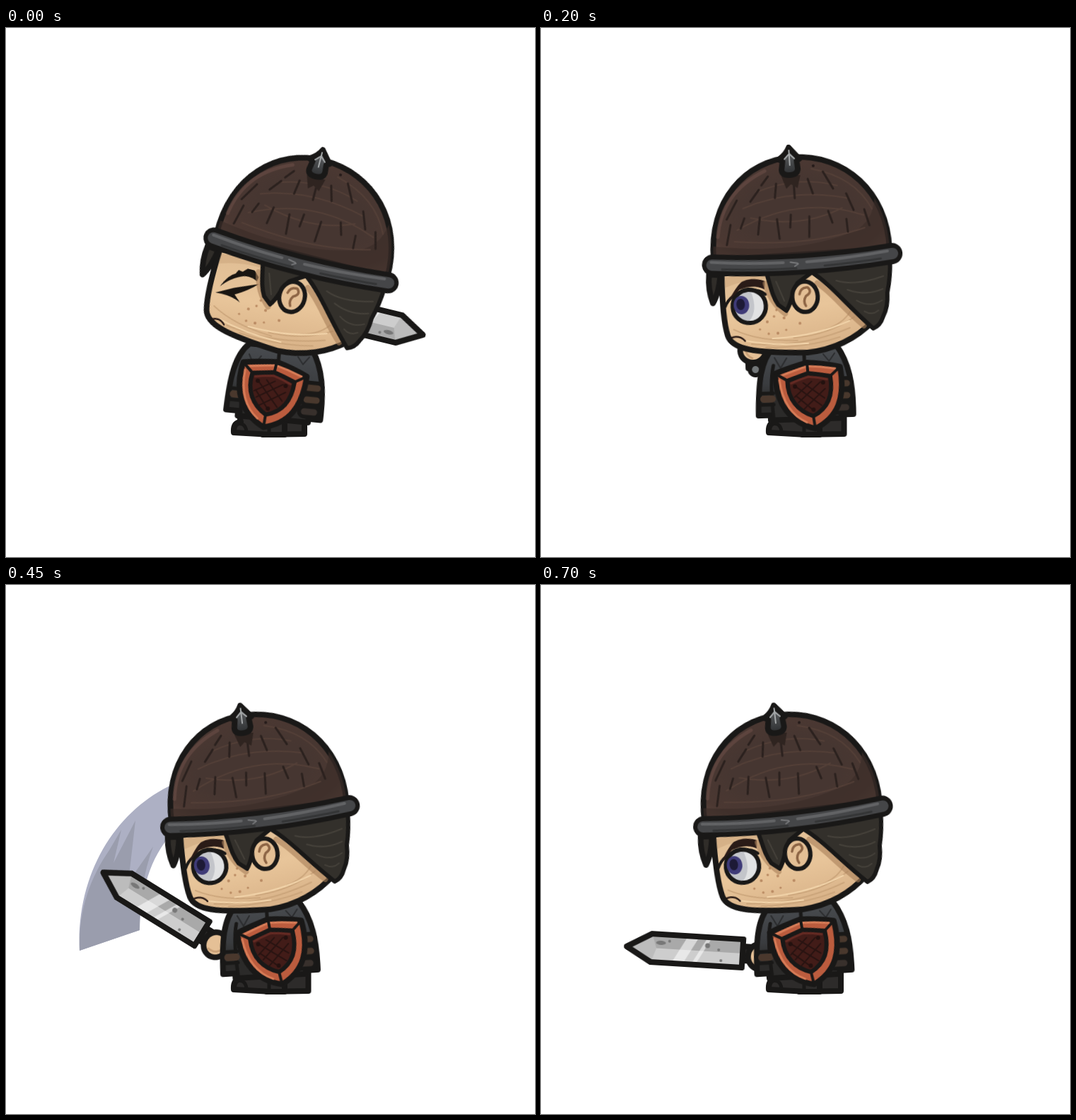
Recreate the animation shown at these times as an HTML page without scripts. Size 748 by 748 pixels, loop 0.75 s.

```html
<!DOCTYPE html>
<html lang="en">
<head>
<meta charset="utf-8">
<title>Sword swing</title>
<style>
  html, body { margin: 0; width: 100%; height: 100%; overflow: hidden; background: #fff; }
  svg { display: block; width: 100vw; height: 100vh; }
  .line { stroke: #191817; stroke-width: 8; stroke-linejoin: round; stroke-linecap: round; }
  .thin { stroke-width: 6; }
  .mark { fill: none; stroke-linecap: round; stroke-linejoin: round; }

  /* 15 poses of 50 ms; the steps sample the motion between the keys */
  .anim { animation: .75s steps(2) -.002s infinite; }
  .head { animation-name: head; transform-origin: 379px 380px; }
  .torso { animation-name: torso; transform-origin: 376px 555px; }
  .shield { animation-name: shield; }
  .sword { animation-name: sword; }
  .foot { animation-name: foot; }
  .trail { animation-name: trail; animation-timing-function: step-end; }
  .open { animation-name: open; animation-timing-function: step-end; }
  .closed { animation-name: closed; animation-timing-function: step-end; }

  @keyframes head {
    0% { transform: translate(25px, 0) rotate(14.4deg); animation-timing-function: steps(3); }
    20% { transform: none; }
    33.33% { transform: translate(-12.4px, 0) rotate(-7.4deg); }
    46.66% { transform: translate(-13px, 0) rotate(-7.2deg); }
    60% { transform: translate(-13.5px, 0) rotate(-6.9deg); }
    73.33% { transform: translate(-14px, 0) rotate(-6.6deg); animation-timing-function: steps(3); }
    93.33%, 100% { transform: translate(-16.6px, 0) rotate(-6.6deg); }
  }
  @keyframes torso {
    0% { transform: translate(2px, 0) rotate(5.6deg); animation-timing-function: steps(3); }
    20% { transform: none; }
    33.33% { transform: rotate(-3.6deg); }
    73.33% { transform: translate(-1px, 0) rotate(-3.6deg); animation-timing-function: steps(3); }
    93.33%, 100% { transform: translate(-2px, 0) rotate(-3.6deg); }
  }
  @keyframes shield {
    0% { transform: translate(372px, 518px) rotate(13.5deg); animation-timing-function: steps(3); }
    20% { transform: translate(377px, 521px) rotate(0deg); }
    33.33% { transform: translate(384px, 519px) rotate(-11deg); }
    46.66% { transform: translate(381px, 519px) rotate(-10.8deg); }
    60% { transform: translate(379px, 519px) rotate(-10.5deg); }
    73.33% { transform: translate(377px, 519px) rotate(-10.3deg); animation-timing-function: steps(3); }
    93.33%, 100% { transform: translate(375px, 519px) rotate(-10deg); }
  }
  @keyframes sword {
    0% { transform: translate(430px, 395px) rotate(193.7deg); animation-timing-function: steps(3); }
    20% { transform: translate(320px, 410px) rotate(113deg); }
    33.33% { transform: translate(284px, 452px) rotate(64.2deg); }
    46.66% { transform: translate(277.7px, 472.5px) rotate(47.5deg); }
    60% { transform: translate(277px, 493px) rotate(31.8deg); }
    73.33% { transform: translate(282px, 511px) rotate(13.5deg); animation-timing-function: steps(3); }
    93.33%, 100% { transform: translate(285px, 521px) rotate(3.5deg); }
  }
  @keyframes foot {
    0% { transform: translateX(-5px); animation-timing-function: steps(3); }
    20% { transform: none; }
    33.33% { transform: translateX(3px); }
    73.33% { transform: translateX(-2px); animation-timing-function: steps(3); }
    93.33%, 100% { transform: translateX(-3px); }
  }
  @keyframes trail {
    0%, 80% { visibility: hidden; }
    53.33% { visibility: visible; }
  }
  @keyframes open {
    0% { visibility: hidden; }
    13.33%, 100% { visibility: visible; }
  }
  @keyframes closed {
    0% { visibility: visible; }
    13.33%, 100% { visibility: hidden; }
  }
</style>
</head>
<body>
<svg viewBox="0 0 748 748">
  <defs>
    <linearGradient id="skin" x1="0" y1="0" x2=".25" y2="1">
      <stop offset="0" stop-color="#dfbd94"/>
      <stop offset=".55" stop-color="#e8c59a"/>
      <stop offset="1" stop-color="#d9b389"/>
    </linearGradient>
    <radialGradient id="leather" cx=".5" cy=".55" r=".62">
      <stop offset=".5" stop-color="#463631"/>
      <stop offset=".85" stop-color="#4b3832"/>
      <stop offset="1" stop-color="#5a433c"/>
    </radialGradient>
    <linearGradient id="iron" x1="0" y1="0" x2="0" y2="1">
      <stop offset="0" stop-color="#66686a"/>
      <stop offset="1" stop-color="#2c2e30"/>
    </linearGradient>
    <linearGradient id="cloth" x1="0" y1="0" x2="0" y2="1">
      <stop offset="0" stop-color="#494c50"/>
      <stop offset=".5" stop-color="#3a3c3f"/>
      <stop offset=".75" stop-color="#2b2a29"/>
    </linearGradient>
    <clipPath id="blade"><path d="M0-20H-129L-164 0L-129 20H0Z"/></clipPath>
    <clipPath id="dome"><path id="domeShape" d="M254 320C252 236 308 182 375 182C449 182 505 240 503 320Z"/></clipPath>
  </defs>

  <g class="anim trail">
    <path fill="#adb0c4" d="M104 517C99 405 158 317 236 282V350C203 385 190 435 189 488Z"/>
    <path fill="#9a9dad" d="M104 517C102 463 118 415 146 375L163 346L152 393L183 333L173 420L208 370C194 408 189 445 189 488Z"/>
  </g>

  <g class="anim sword">
    <path class="line" fill="#2a2827" d="M0-10H50V10H0Z"/>
    <circle class="line thin" cx="52" r="8" fill="#737779"/>
    <ellipse class="line" cx="25" cy="3" rx="17" ry="18" fill="#e5c096"/>
    <path class="mark" stroke="#c89f76" stroke-width="3" d="M19 13Q31 15 36 4"/>
    <path class="line" fill="#cdcdcd" d="M0-20H-129L-164 0L-129 20H0Z"/>
    <g clip-path="url(#blade)">
      <path fill="#a9a9a9" d="M0-20H-129L-164 0H0Z"/>
      <path fill="#bcbcbc" d="M-164 0L-129-20L-122 0L-129 20Z"/>
      <path fill="#fff" opacity=".55" d="M-100 20L-78-20H-62L-84 20ZM-72 20L-50-20H-44L-66 20Z"/>
      <g fill="#777">
        <ellipse cx="-116" cy="-8" rx="7" ry="3"/><circle cx="-50" cy="-8" r="3.5"/>
        <circle cx="-30" cy="12" r="2"/><circle cx="-34" cy="-3" r="2"/><circle cx="-104" cy="-11" r="2"/>
      </g>
    </g>
    <path class="mark line" d="M0-20H-129L-164 0L-129 20H0Z"/>
  </g>

  <g fill="#2d2b2a">
    <path class="anim foot line" d="M368 540H427V574L368 575Z"/>
    <path class="line" d="M328 540H394V575H375L322 572Q321 558 332 557Z"/>
    <path class="mark" stroke="#191817" stroke-width="5" d="M326 560Q338 557 340 570M372 552V572"/>
  </g>

  <g class="anim torso">
    <path class="line" fill="url(#cloth)" d="M332 450C313 468 309 500 308 546H325V553H425V548H442C443 505 438 475 421 450Z"/>
    <path class="mark" stroke="#2b2c2e" stroke-width="2" d="M333 465l8 15 9-14M330 485l10 10M402 462l8 10 8-11"/>
    <path class="mark" stroke="#191817" stroke-width="5" d="M331 476Q325 500 329 548M310 515H330M310 531H330M375 455V470"/>
    <path class="mark" stroke="#4a382d" stroke-width="10" d="M316 523H328"/>
    <g class="mark">
      <path stroke="#191817" stroke-width="20" d="M420 504H434M420 521H434M418 538H432"/>
      <path stroke="#49382d" stroke-width="9" d="M420 504H434M420 521H434"/>
      <path stroke="#38302c" stroke-width="9" d="M418 538H432"/>
    </g>
  </g>

  <g class="anim shield">
    <path class="line" fill="#bb5c3e" d="M-46-36Q-22-43 0-47Q23-44 46-37C50 8 36 34 3 47C-30 36-50 8-46-36Z"/>
    <path class="mark" stroke="#d77c57" stroke-width="3" d="M-41-31Q-18-38 0-42Q20-40 39-35M-41-26C-40 4-28 26-8 37"/>
    <path class="line thin" fill="#421c18" d="M-30-24Q-15-28 0-32Q16-29 31-25C33 2 24 20 2 29C-19 20-32 2-30-24Z"/>
    <path class="mark" stroke="#642a23" stroke-width="3" d="M-25-20Q-14-24 0-27Q14-25 26-21"/>
    <path class="mark" stroke="#281311" stroke-width="2" d="M-18-14L15 15M-8-19L20 5M-20-2L4 22M16-18L-17 8M22-8L-10 18M4-20L-22 0"/>
    <g fill="#23110f"><circle cx="-20" cy="-15" r="3"/><circle cx="20" cy="-17" r="3"/><circle cx="3" cy="20" r="3"/></g>
    <path class="mark" stroke="#191817" stroke-width="4" d="M0-46V-34M-45-35L-31-25M45-36L32-26M3 46L2 31"/>
  </g>

  <g class="anim head">
    <path class="line" fill="#302d29" d="M246 340Q243 362 249 381Q258 368 262 342Z"/>
    <path class="line" fill="url(#skin)" d="M264 340C262 380 262 408 267 428C272 447 300 455 378 459C422 457 452 440 474 420L498 340Z"/>
    <path fill="#b88e66" opacity=".3" d="M268 345H330V352Q300 349 268 360Z"/>
    <g class="mark" stroke="#cba57b" stroke-width="2">
      <path d="M300 442Q370 452 440 428M320 448Q380 452 425 440M360 437Q410 436 447 413M276 420Q310 439 365 441M405 428Q430 422 442 405"/>
      <path stroke="#f2d4aa" d="M330 436Q390 437 440 418M288 436Q330 447 380 446"/>
    </g>
    <g fill="#b98a62">
      <circle cx="324" cy="412" r="2"/><circle cx="334" cy="405" r="1.7"/><circle cx="348" cy="408" r="2"/>
      <circle cx="338" cy="396" r="1.7"/><circle cx="325" cy="429" r="1.7"/><circle cx="338" cy="429" r="2"/>
      <circle cx="350" cy="425" r="1.6"/><circle cx="370" cy="417" r="2"/><circle cx="313" cy="422" r="1.6"/>
    </g>

    <g class="anim open">
      <ellipse class="line thin" cx="300" cy="388.5" rx="23.5" ry="23.5" fill="#c3c5ca"/>
      <path fill="#e1e2e3" d="M304 369Q321 373 320 391Q316 409 299 409Q312 395 304 369Z"/>
      <ellipse cx="289" cy="386" rx="11" ry="13" fill="#3f3b78"/>
      <ellipse cx="288" cy="385" rx="6" ry="8" fill="#1d1a36"/>
      <path class="mark" stroke="#191817" stroke-width="4" d="M266 387Q274 369 298 366Q315 364 324 373"/>
      <path fill="#2a1b17" d="M270 381Q284 358 292 353Q305 347 324 354L323 366Q308 357 288 364Z"/>
      <path class="mark" stroke="#2a1b17" stroke-width="2.5" d="M273 431Q284 428 291 437"/>
    </g>
    <g class="anim closed" fill="#191511">
      <path d="M273 401L297 388L330 374Q316 388 300 397L310 406Q294 399 273 401Z"/>
      <path d="M277 391Q284 373 294 368L297 362L303 363L309 357L319 357L327 365L326 371Q312 364 299 372Q287 378 277 391Z"/>
      <path class="mark" stroke="#2a1b17" stroke-width="2.5" d="M279 438Q289 434 296 442"/>
    </g>

    <path class="mark" stroke="#a87f59" stroke-width="8" opacity=".6" d="M325 358Q331 386 350 402M398 362C416 374 434 402 460 426"/>
    <g class="line thin" fill="#33302b">
      <path d="M327 342C332 362 333 376 341 389L352 398C360 388 361 374 370 360L398 342Z"/>
      <path d="M390 345C418 366 438 396 473 431Q483 428 488 415Q496 402 496 382Q502 360 503 335Z"/>
    </g>
    <path class="mark" stroke="#45413a" stroke-width="2" d="M425 360Q450 370 492 358M440 374Q465 385 490 376M452 390Q470 402 488 392M462 406Q472 413 482 406M340 356L350 384"/>
    <ellipse class="line thin" cx="379.5" cy="380" rx="18" ry="21.5" fill="#e3bf95"/>
    <path class="mark" stroke="#8c6444" stroke-width="3.5" d="M372 376Q374 366 384 367Q391 374 381 379Q376 386 380 393"/>

    <use href="#domeShape" class="line" fill="url(#leather)"/>
    <g clip-path="url(#dome)" class="mark">
      <path fill="#3b2d29" stroke="none" opacity=".65" d="M250 300Q375 322 460 290Q492 270 486 225L515 260V330H250Z"/>
      <path stroke="#654b43" stroke-width="5" opacity=".7" d="M262 288C268 245 293 216 334 199"/>
      <path stroke="#574139" stroke-width="2" opacity=".8" d="M290 280Q380 235 470 270M300 250Q370 225 450 245M285 296Q390 310 470 288M310 264Q380 284 440 258M320 228Q380 208 435 226M400 200Q460 215 482 262"/>
      <path stroke="#2b211e" stroke-width="3" d="M338 207L328 219M324 225L311 241M292 238L276 264M349 218L346 238M374 221V240M394 214L400 235M416 205L429 230M447 238L456 262M281 272L274 300M301 264L295 278M323 264L319 288M347 268L349 296M367 263L365 281M393 267L391 296M420 261L425 278M445 274L446 292M471 262L477 285"/>
      <path fill="#2f2420" d="M357 208H384L379 226L370 220L363 226Z"/>
    </g>
    <circle cx="403" cy="196" r="2" fill="#241b19"/>
    <path class="line" fill="url(#iron)" d="M370 168L384 185L380 187L381 199Q380 207 369 207Q358 207 358 199L360 187L355 184Q366 177 370 168Z"/>
    <path class="mark" stroke="#a4a7a8" stroke-width="2" d="M370 172V193M363 184L370 177L377 184"/>

    <g class="mark">
      <path stroke="#191817" stroke-width="30" d="M252 327Q378 340 506 327"/>
      <path stroke="#454648" stroke-width="16" d="M251 327Q378 340 507 327"/>
      <path stroke="#626365" stroke-width="4" d="M250 323Q300 329 352 330M385 331Q440 330 500 323"/>
      <path stroke="#343536" stroke-width="3" d="M265 334Q320 339 370 339M410 338Q460 336 490 333"/>
      <path stroke="#77787a" stroke-width="2" d="M362 330L372 332M368 336L373 333"/>
    </g>
  </g>
</svg>
</body>
</html>
```
